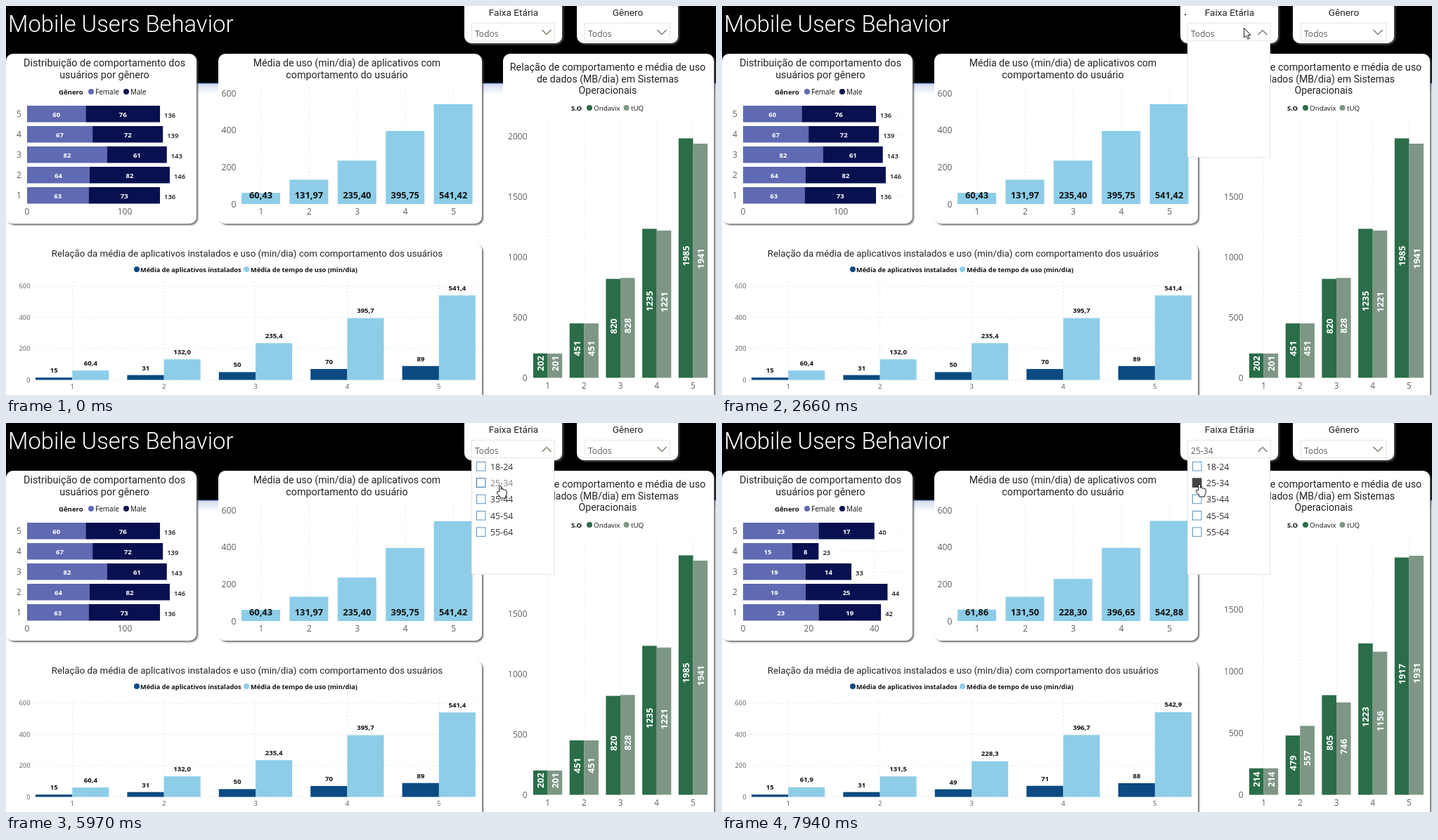
Write an HTML page that moves like this. It is 1010x554 px and loops after 8000 ms.

```html
<!DOCTYPE html>
<html lang="pt">
<head>
<meta charset="utf-8">
<title>Mobile Users Behavior</title>
<style>
html, body { margin: 0; width: 100%; height: 100%; overflow: hidden; background: #fff; }
svg { display: block; }
text { font-family: "Open Sans", "Noto Sans", sans-serif; white-space: pre; }
.din { font-family: Roboto, sans-serif; fill: #252423; }
.grid { stroke: #d4d4d4; stroke-width: 1; stroke-dasharray: 1 4; }
.card { fill: #fff; filter: url(#shadow); }
.box { fill: #fff; stroke: #e6e6e6; }
.chev { fill: none; stroke: #6b6a55; stroke-width: 1.1; }
</style>
</head>
<body>
<svg width="1010" height="554" viewBox="0 0 1010 554">
  <defs>
    <filter id="shadow" x="-5%" y="-5%" width="110%" height="110%">
      <feDropShadow dx="2" dy="2" stdDeviation="1.1" flood-color="#555" flood-opacity=".85"/>
    </filter>
    <linearGradient id="fade" x1="0" y1="0" x2="0" y2="1">
      <stop offset="0" stop-color="#cfd9ef"/>
      <stop offset="1" stop-color="#fff"/>
    </linearGradient>
  </defs>
  <rect width="1010" height="554" fill="#fff"/>
  <rect width="1010" height="110" fill="#000"/>
  <rect y="110" width="1010" height="16" fill="url(#fade)"/>
  <rect y="109.6" width="1010" height="1.2" fill="#5b82cc"/>
  <g id="frame"></g>
  <g id="charts"></g>
  <g id="slicers"></g>
  <g id="menu"></g>
  <g id="spinner" fill="#555"></g>
  <g id="buttons" fill="#fff">
    <rect x="616" y="48" width="25" height="22"/>
    <rect x="644" y="48" width="23" height="22"/>
  </g>
  <g id="tip">
    <rect x="712.5" y="103.5" width="47" height="24" fill="#fff" stroke="#8a8a8a"/>
    <text x="736" y="119.5" font-size="11.5" text-anchor="middle" fill="#444">25-34</text>
  </g>
  <circle id="click" r="12" fill="#ff0" fill-opacity=".47"/>
  <g id="cursor" stroke-linejoin="round">
    <path id="arrow" d="M0 0V13.5L3.1 10.7L5.2 15.6L7.4 14.6L5.3 9.9H9.4Z" fill="#fff" stroke="#111"/>
    <path id="hand" d="M-1.3 9V1.2Q0-.9 1.4 1.2V6Q3-.0 4.1 6.3Q5.8 4.7 6.7 6.9Q8.6 5.7 9.2 8V12.5L7.7 15.6V18H-.2V16L-4.4 11Q-5.4 8.6-3.4 8.6Z" fill="#fff" stroke="#111"/>
  </g>
</svg>
<script>
const LOOP = 8000;
const STEP = 1000 / 15;
const GREY = "#605e5c";
const $ = id => document.getElementById(id);

const all = {
  female: [63, 64, 82, 67, 60], male: [73, 82, 61, 72, 76],
  rowTicks: [0, 100], rowScale: 1.39,
  use: [60.43, 131.97, 235.4, 395.749, 541.42],
  apps: [15, 31, 50, 70, 89],
  sysA: [202, 451, 820, 1235, 1985], sysB: [201, 451, 828, 1221, 1941],
  sysScale: 0.1718
};
const young = {
  female: [23, 19, 19, 15, 23], male: [19, 25, 14, 8, 17],
  rowTicks: [0, 20, 40], rowScale: 4.67,
  use: [61.86, 131.5, 228.3, 396.652, 542.88],
  apps: [15, 31, 49, 71, 88],
  sysA: [214, 479, 805, 1223, 1917], sysB: [214, 557, 746, 1156, 1931],
  sysScale: 0.1763
};

const text = (x, y, s, size, o = {}) =>
  `<text x="${x}" y="${y}" font-size="${size}" fill="${o.fill || "#111"}"` +
  ` font-weight="${o.weight || 400}" text-anchor="${o.anchor || "start"}"` +
  (o.turn ? ` transform="rotate(-90 ${x} ${y})"` : "") + `>${s}</text>`;
const din = (x, y, s, size) =>
  `<text class="din" x="${x}" y="${y}" font-size="${size}" text-anchor="middle">${s}</text>`;
const rect = (x, y, w, h, fill) =>
  `<rect x="${x}" y="${y}" width="${w}" height="${h}" fill="${fill}"/>`;
const card = (x, y, w, h) =>
  `<rect class="card" x="${x}" y="${y}" width="${w}" height="${h}" rx="10"/>`;
const line = (x1, y1, x2, y2) =>
  `<path class="grid" d="M${x1} ${y1}L${x2} ${y2}"/>`;
const dot = (x, y, fill) => `<circle cx="${x}" cy="${y}" r="4" fill="${fill}"/>`;
const mid = { anchor: "middle" };
const axis = { anchor: "middle", fill: GREY };
const axisEnd = { anchor: "end", fill: GREY };
const bold = { weight: 700 };
const boldMid = { weight: 700, anchor: "middle" };
const whiteMid = { weight: 700, anchor: "middle", fill: "#fff" };
const lerp = (a, b, k) => a + (b - a) * k;
const smooth = u => u * u * (3 - 2 * u);
const clamp = u => Math.max(0, Math.min(1, u));
const comma = (v, n) => v.toFixed(n).replace(".", ",");

const C = {
  female: "#5f6ab2", male: "#08104f", sky: "#8dcde8",
  navy: "#0b4a82", green: "#2a6d48", sage: "#7e9785"
};

function frame() {
  return card(0, 68, 271, 242) + card(302, 68, 375, 242) +
    card(-12, 338, 689, 240) + card(707, 68, 300, 520) +
    card(652, -14, 139, 67) + card(812, -14, 144, 67) +
    `<text x="3" y="37" font-size="32.8" style="font-family:Roboto,sans-serif" font-weight="300" fill="#fff">Mobile Users Behavior</text>` +
    din(140, 86, "Distribuição de comportamento dos", 14.4) +
    din(140, 102.5, "usuários por gênero", 14.4) +
    text(75, 125.5, "Gênero", 9.6, bold) +
    dot(121, 122, C.female) + text(127, 125.5, "Female", 10) +
    dot(171, 122, C.male) + text(177, 125.5, "Male", 10) +
    din(485, 86, "Média de uso (min/dia) de aplicativos com", 14.05) +
    din(485, 102.5, "comportamento do usuário", 14.3) +
    din(343, 357, "Relação da média de aplicativos instalados e uso (min/dia) com comportamento dos usuários", 13.3) +
    dot(186, 375, C.navy) + text(191, 378.5, "Média de aplicativos instalados", 9.2, bold) +
    dot(342, 375, C.sky) + text(348, 378.5, "Média de tempo de uso (min/dia)", 9.25, bold) +
    din(856, 92, "Relação de comportamento e média de uso", 14.4) +
    din(856, 108.5, "de dados (MB/dia) em Sistemas", 14.1) +
    din(856, 125, "Operacionais", 14.2) +
    text(804, 149, "S.O", 9.6, bold) +
    dot(830, 145, C.green) + text(836, 149, "Ondavix", 9.8) +
    dot(882.5, 145, C.sage) + text(889, 149, "tUQ", 9.8);
}

function genderChart(d, px) {
  let s = "";
  for (const v of d.rowTicks) {
    const x = 30 + v * d.rowScale;
    s += line(x, 136, x, 284) + text(x, 297, v, 12, axis);
  }
  for (let i = 0; i < 5; i++) {
    const y = 270 - 29 * i;
    const f = px(o => o.female[i] * o.rowScale);
    const m = px(o => o.male[i] * o.rowScale);
    s += line(30, y, 258, y) + text(18.5, y + 4, i + 1, 12, axis) +
      rect(30, y - 12, f, 23.5, C.female) + rect(30 + f, y - 12, m, 23.5, C.male) +
      text(30 + f / 2, y + 3.5, d.female[i], 9.6, whiteMid) +
      text(30 + f + m / 2, y + 3.5, d.male[i], 9.6, whiteMid) +
      rect(34 + f + m, y - 5, 23, 12, "#fff") +
      text(36 + f + m, y + 5, d.female[i] + d.male[i], 9.4, { weight: 600 });
  }
  return s;
}

function usageChart(d, px) {
  let s = "";
  for (let v = 0; v <= 600; v += 200) s += text(327.5, 286.5 - v * .2627, v, 12.2, axisEnd);
  for (let i = 0; i < 5; i++) {
    const x = 363 + 68.4 * i;
    const h = px(o => o.use[i] * .2627);
    s += line(x, 116, x, 282) + rect(x - 28, 282 - h, 55, h, C.sky) +
      text(x - .5, 274, comma(d.use[i], 2), 12.8, boldMid) +
      text(x, 297, i + 1, 12, axis);
  }
  return s;
}

function appsChart(d, px) {
  let s = "";
  for (let v = 0; v <= 600; v += 200) {
    const y = 532.5 - v * .2222;
    s += line(42, y, 668, y) + text(34.5, y + 3, v, 9.3, axisEnd);
  }
  for (let i = 0; i < 5; i++) {
    const x = 94.3 + 130.4 * i;
    const a = px(o => o.apps[i] * .2222);
    const u = px(o => o.use[i] * .2222);
    s += line(x, 392, x, 532) +
      rect(x - 52.3, 532.5 - a, 52.3, a, C.navy) + rect(x, 532.5 - u, 52, u, C.sky) +
      text(x - 26, 525.5 - a, d.apps[i], 9.6, boldMid) +
      text(x + 26, 525 - u, comma(d.use[i], 1), 9.6, boldMid) +
      text(x, 545, i + 1, 9.8, axis);
  }
  return s;
}

function systemChart(d, px) {
  let s = "";
  for (let v = 0; v <= 2000; v += 500) {
    const y = 529.5 - v * d.sysScale;
    s += text(741.5, y + 4.5, v, 12, axisEnd);
  }
  const turned = { ...whiteMid, turn: true };
  for (let i = 0; i < 5; i++) {
    const x = 770.6 + 51.7 * i;
    s += line(x, 167, x, 529);
    [["sysA", -20.6, C.green], ["sysB", 0, C.sage]].forEach(([key, dx, fill]) => {
      const h = px(o => o[key][i] * o.sysScale);
      s += rect(x + dx, 529.5 - h, 20.6, h, fill) +
        text(x + dx + 15.2, 526.5 - h / 2, d[key][i], 12.8, turned);
    });
    s += text(x, 545, i + 1, 11.8, axis);
  }
  return s;
}

function charts(k) {
  const d = k > 0 ? young : all;
  const px = get => lerp(get(all), get(young), k);
  return genderChart(d, px) + usageChart(d, px) + appsChart(d, px) + systemChart(d, px);
}

function slicer(x, w, title, value, open) {
  const c = x + w - 11;
  return din(x + w / 2 + 1, 13.5, title, 13.6) +
    `<rect class="box" x="${x + .5}" y="24.5" width="${w}" height="25"/>` +
    text(x + 5, 44, value, 12.1, { fill: GREY }) +
    `<path class="chev" d="M${c - 6.5} ${open ? 41 : 34}l6.5 ${open ? -6.5 : 6.5}l6.5 ${open ? 6.5 : -6.5}"/>`;
}

function menu(filled, chosen) {
  let s = `<rect class="box" x="662.5" y="49.5" width="117" height="166"/>`;
  if (!filled) return s;
  ["18-24", "25-34", "35-44", "45-54", "55-64"].forEach((label, i) => {
    const y = 62 + 23.35 * i;
    const on = chosen && i === 1;
    const hover = !chosen && i === 1;
    s += `<rect x="669.5" y="${y - 6.5}" width="12.5" height="12.5" fill="${on ? "#444" : "#fff"}" stroke="${on ? "#444" : hover ? "#2b6ea5" : "#5b93c0"}"/>` +
      text(689, y + 4.7, label, 12.4, { fill: hover ? "#858585" : "#333" });
  });
  return s;
}

// Time, x, y of the pointer tip
const path = [
  [1060, 989, 54], [1130, 690, 486], [1200, 306, 471], [1410, 306, 471],
  [1466, 420, 330], [1533, 640, 160], [1600, 911, 57], [1670, 915, 51],
  [1800, 890, 42], [2000, 800, 34], [2220, 743, 31], [2660, 743, 31],
  [3400, 710, 80], [4190, 703, 89], [7340, 703, 89], [7840, 679, 87]
];
function pointer(t) {
  const n = path.findIndex(p => p[0] > t);
  if (n === 0) return path[0].slice(1);
  if (n < 0) return path[path.length - 1].slice(1);
  const [t0, x0, y0] = path[n - 1], [t1, x1, y1] = path[n];
  const k = (t - t0) / (t1 - t0);
  return [lerp(x0, x1, k), lerp(y0, y1, k)];
}

function spinner(e) {
  let s = "";
  for (let i = 0; i < 5 && e >= i * 74; i++) {
    const a = (225 + 360 * e / 808 - i * 33) * Math.PI / 180;
    s += `<circle cx="${664 + 6.5 * Math.sin(a)}" cy="${8 - 6.5 * Math.cos(a)}" r="1.25"/>`;
  }
  return s;
}

const cache = {};
function put(id, key, make) {
  if (cache[id] === key) return;
  cache[id] = key;
  $(id).innerHTML = make();
}
const show = (id, on) => $(id).setAttribute("visibility", on ? "visible" : "hidden");

function draw(t) {
  const q = Math.floor((t + 8) / STEP) * STEP;
  const within = (a, b) => t >= a && t < b;
  const open = t >= 2660, filled = t >= 5970, chosen = t >= 7380;
  const k = smooth(clamp((q - 7470) / 390));

  put("charts", k, () => charts(k));
  put("slicers", `${open}${chosen}`, () =>
    slicer(662, 118, "Faixa Etária", chosen ? "25-34" : "Todos", open) +
    slicer(823, 121, "Gênero", "Todos", false));
  put("menu", `${open}${filled}${chosen}`, () => open ? menu(filled, chosen) : "");

  const spin = within(2660, 5970) ? Math.max(0, q - 2660) : -1;
  put("spinner", spin, () => spin < 0 ? "" : spinner(spin));

  const [x, y] = pointer(q);
  const at = `translate(${x} ${y})`;
  $("cursor").setAttribute("transform", at);
  $("click").setAttribute("transform", at);
  show("cursor", t >= 1060);
  $("arrow").style.display = filled ? "none" : "";
  $("hand").style.display = filled ? "" : "none";
  show("click", within(2380, 2520) || within(6920, 7050));
  show("tip", within(6520, 6920));
  show("buttons", within(1530, 1670));
}

$("frame").innerHTML = frame();
const start = performance.now();
function tick() {
  draw((performance.now() - start) % LOOP);
  requestAnimationFrame(tick);
}
tick();
</script>
</body>
</html>
```
